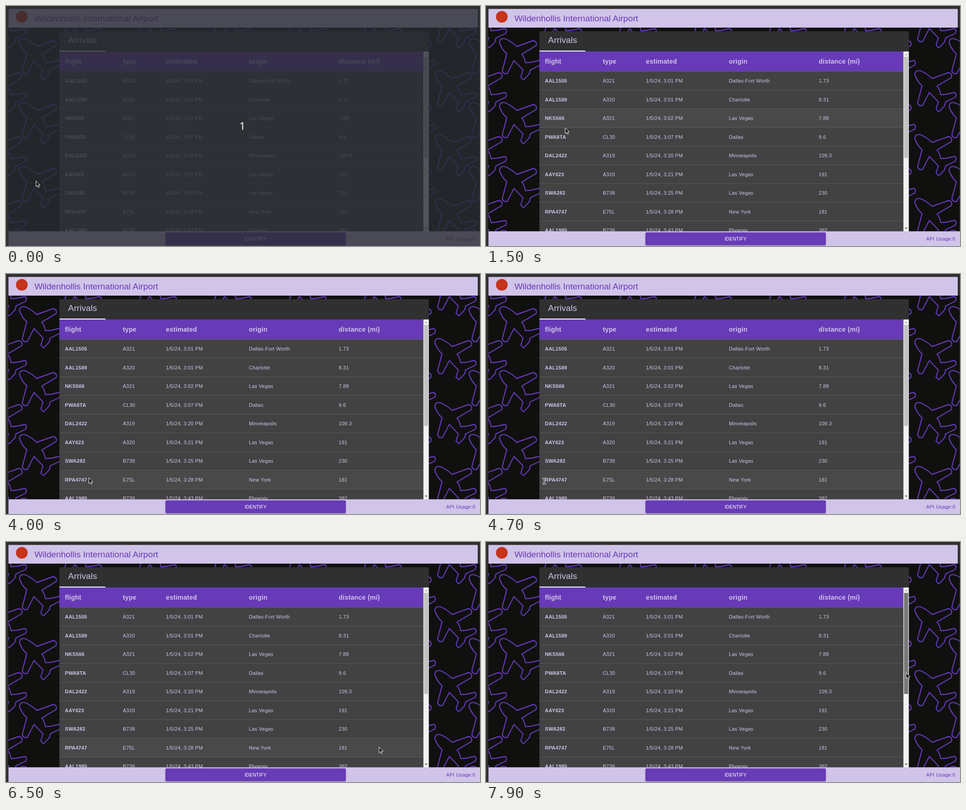
An HTML page that plays this animation: 1050 by 533 pixels, repeating every 8 s.

```html
<!DOCTYPE html>
<html lang="en">
<head>
<meta charset="utf-8">
<title>Arrivals</title>
<style>
html, body { margin: 0; width: 100%; height: 100%; overflow: hidden; background: #303030; }
svg { display: block; width: 100%; height: 100%; }
text { font-family: "Liberation Sans", Arial, sans-serif; fill: #d1c4e9; white-space: pre; }
.title { font-size: 19.2px; }
.head { font-size: 14.4px; font-weight: bold; letter-spacing: .2px; }
.cell { font-size: 11.2px; letter-spacing: .2px; }
.bold { font-weight: bold; }
.purple { fill: #673ab7; }
</style>
</head>
<body>
<svg id="stage" viewBox="0 0 1050 533" preserveAspectRatio="none">
  <defs>
    <path id="plane" d="M30 82Q30 70 43 73Q57 79 68 90L104 77Q114 78 111 88L79 107Q86 115 87 126L100 125L118 121Q124 126 119 132L98 142Q97 150 94 153L83 164L77 158L82 142L62 121L47 150Q39 152 36 144L46 106Q36 98 30 82Z"/>
    <clipPath id="backdrop"><rect x="5" y="48" width="1044" height="452"/></clipPath>
    <filter id="shadow" x="-5%" y="-30%" width="110%" height="170%">
      <feDropShadow dx="0" dy="1.5" stdDeviation="1.2" flood-opacity=".35"/>
    </filter>
  </defs>
  <rect width="1050" height="533" fill="#303030"/>
  <rect x="5" y="48" width="1044" height="452" fill="#10100e"/>
  <g id="planes" clip-path="url(#backdrop)" fill="none" stroke="#6239b3" stroke-width="2.4" stroke-linejoin="round"></g>

  <rect x="5.5" y="6.5" width="1039.5" height="41.5" fill="#d1c4e9"/>
  <circle cx="35" cy="24" r="13" fill="#c5341b"/>
  <text class="title purple" x="63" y="34">Wildenhollis International Airport</text>

  <rect x="118.3" y="56" width="818.4" height="45" fill="#303030"/>
  <text class="title" x="137.6" y="82">Arrivals</text>
  <rect x="118.3" y="99" width="102" height="2" fill="#fff"/>

  <rect x="118.3" y="101" width="806.4" height="400" fill="#424242"/>
  <rect x="118.3" y="101" width="806.4" height="44" fill="#673ab7"/>
  <rect id="hover" x="118.3" width="806.4" height="41.5" fill="#fff" fill-opacity=".04"/>
  <g id="table"></g>

  <rect x="924.6" y="101" width="12" height="400" fill="#f1f1f1"/>
  <rect id="thumb" x="926" y="113" width="9.2" height="224.4"/>
  <path d="M927.8 109L930.6 105.8L933.4 109Z" fill="#a3a3a3"/>
  <path d="M927.8 492L930.6 495.2L933.4 492Z" fill="#505050"/>

  <rect x="5.5" y="500.4" width="1044.5" height="32.6" fill="#d1c4e9"/>
  <rect x="353.2" y="502.8" width="399.6" height="28.2" rx="3" fill="#673ab7" filter="url(#shadow)"/>
  <text x="552.9" y="521" text-anchor="middle" style="font-size:10.67px;fill:#fff">IDENTIFY</text>
  <text class="cell purple" x="975" y="521">API Usage:0</text>

  <g id="countdown">
    <rect x="5" y="6" width="1045" height="527" fill="#282c32" fill-opacity=".8"/>
    <text x="523.5" y="275" text-anchor="middle" style="font:24px 'Noto Sans',sans-serif;fill:#f4f4f4">1</text>
  </g>
  <path id="arrow" d="M.5 .5V13.2L3.4 10.5L5.5 15.3L7.6 14.4L5.5 9.7H9.5Z" fill="#111" stroke="#fff" stroke-width="1"/>
  <g id="beam" fill="none" stroke-linecap="square">
    <path d="M-2.5 -6H-1L0 -5L1 -6H2.5M0 -5V5M-2.5 6H-1L0 5L1 6H2.5" stroke="#fff" stroke-width="2.6"/>
    <path d="M-2.5 -6H-1L0 -5L1 -6H2.5M0 -5V5M-2.5 6H-1L0 5L1 6H2.5" stroke="#111" stroke-width="1"/>
  </g>
</svg>
<script>
const LOOP = 8000, STEP = 100;
const TOP = 145.2, ROW = 41.55;
const COLUMNS = [130.5, 258.7, 354.3, 538, 737];
const HEADS = ["flight", "type", "estimated", "origin", "distance (mi)"];
const FLIGHTS = [
  ["AAL1505", "A321", "3:01", "Dallas-Fort Worth", "1.73"],
  ["AAL1589", "A320", "3:01", "Charlotte", "8.31"],
  ["NKS566", "A321", "3:02", "Las Vegas", "7.88"],
  ["PWA8TA", "CL30", "3:07", "Dallas", "9.6"],
  ["DAL2422", "A319", "3:20", "Minneapolis", "109.3"],
  ["AAY623", "A320", "3:21", "Las Vegas", "191"],
  ["SWA282", "B738", "3:25", "Las Vegas", "230"],
  ["RPA4747", "E75L", "3:28", "New York", "181"],
  ["AAL1980", "B738", "3:43", "Phoenix", "382"]
];
// Pointer path: time, x, y
const PATH = [
  [0, 66, 388], [300, 66, 388], [400, 84, 335], [500, 43, 262], [600, 60, 222],
  [700, 60, 222], [900, 81, 219], [1300, 81, 219], [2100, 458, 422], [2200, 458, 422],
  [2500, 478, 440], [2600, 478, 440], [2700, 505, 457.5], [2900, 505, 457.5],
  [3400, 380, 462], [3800, 267, 456], [4000, 183, 452], [4700, 129, 460],
  [4800, 129, 460], [5400, 174, 461], [5700, 209, 464], [5900, 480, 448],
  [6000, 715, 455], [6200, 715, 455], [6500, 826, 455], [7100, 922, 303],
  [7500, 930, 290], [LOOP, 930, 290]
];

const $ = id => document.getElementById(id);
const show = (el, on) => el.setAttribute("visibility", on ? "visible" : "hidden");

function add(parent, tag, attrs, text = "") {
  const el = document.createElementNS("http://www.w3.org/2000/svg", tag);
  for (const key in attrs) el.setAttribute(key, attrs[key]);
  el.textContent = text;
  parent.append(el);
}

function build() {
  for (let row = -2; row < 7; row++)
    for (let col = -1; col < 7; col++)
      add($("planes"), "use", { href: "#plane", x: col * 166 + (row & 1) * 90, y: row * 71 });

  const table = $("table");
  HEADS.forEach((head, i) => add(table, "text", { class: "head", x: COLUMNS[i], y: 128 }, head));
  FLIGHTS.forEach((flight, r) => {
    const y = TOP + r * ROW;
    add(table, "rect", { x: 118.3, y: Math.round(y - .6), width: 806.4, height: 1, fill: "#fff", "fill-opacity": .12 });
    flight.forEach((value, i) => add(table, "text",
      { class: i ? "cell" : "cell bold", x: COLUMNS[i], y: Math.round(y + 24.8) },
      i === 2 ? `1/5/24, ${value} PM` : value));
  });
}

function pointer(t) {
  const i = PATH.findIndex(key => key[0] > t);
  const [t0, x0, y0] = PATH[i - 1], [t1, x1, y1] = PATH[i];
  const k = (t - t0) / (t1 - t0);
  return [x0 + (x1 - x0) * k, y0 + (y1 - y0) * k];
}

function render(time) {
  const t = Math.floor((time % LOOP) / STEP) * STEP;
  const [x, y] = pointer(t);
  const onText = x > 128 && x < 181 && y > 451 && y < 466;
  const place = `translate(${Math.round(x)} ${Math.round(y)})`;
  $("arrow").setAttribute("transform", place);
  $("beam").setAttribute("transform", place);
  show($("arrow"), !onText);
  show($("beam"), onText);

  show($("hover"), x > 118 && x < 924 && y > TOP);
  $("hover").setAttribute("y", TOP + Math.max(0, Math.floor((y - TOP) / ROW)) * ROW);
  $("thumb").setAttribute("fill", t >= 7800 ? "#787878" : t >= 7200 ? "#a8a8a8" : "#c1c1c1");
  show($("countdown"), t < 100);
}

build();
const start = performance.now();
function tick() {
  render(performance.now() - start);
  requestAnimationFrame(tick);
}
tick();
</script>
</body>
</html>
```
